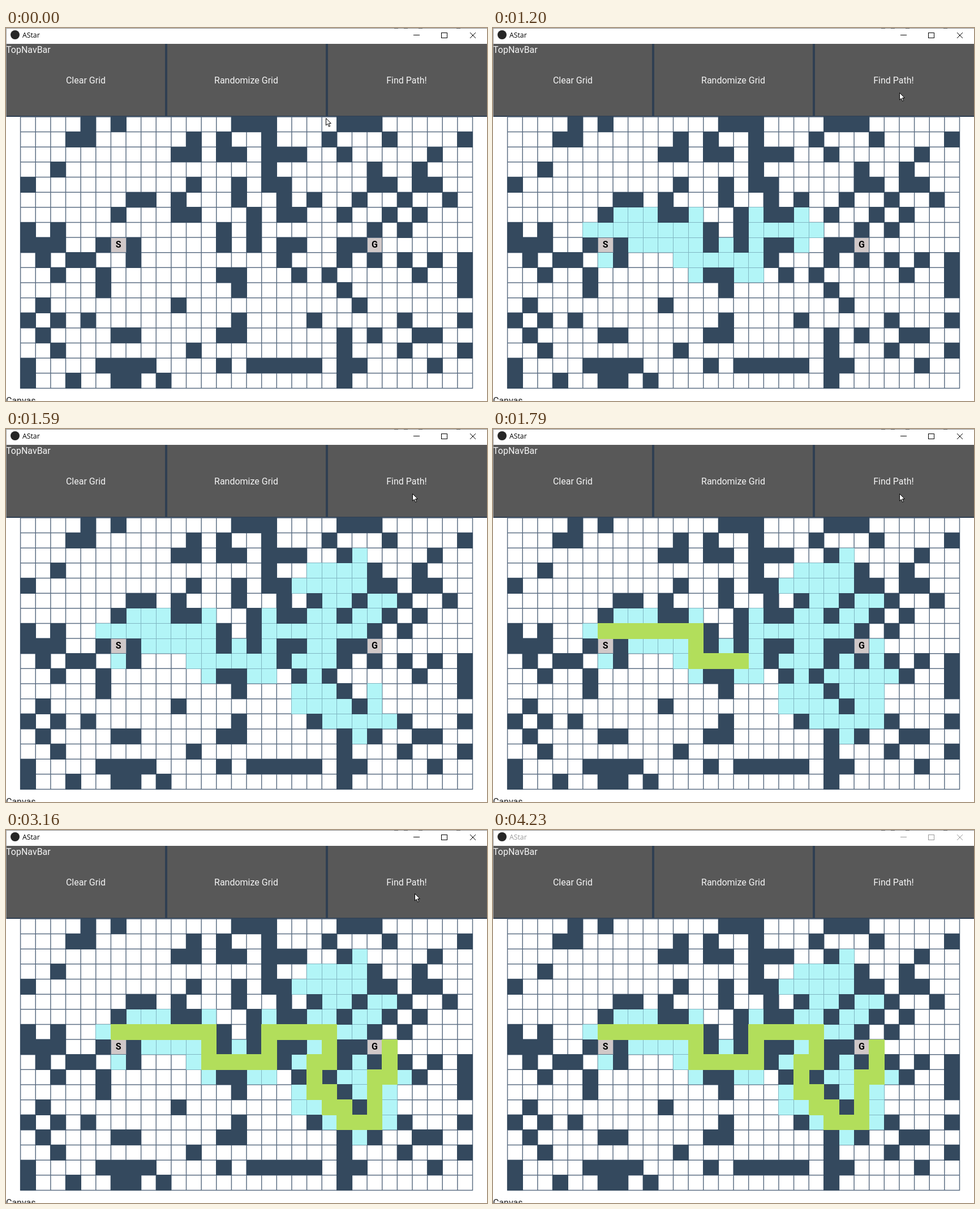
An HTML page with a canvas that plays this animation: 850 px wide and 659 px high, repeating every 4830 ms.

```html
<!DOCTYPE html>
<html lang="en">
<head>
<meta charset="utf-8">
<title>AStar</title>
<style>
  html, body { margin: 0; width: 100%; height: 100%; overflow: hidden; background: #fff; }
  canvas { display: block; }
</style>
</head>
<body>
<canvas id="stage" width="850" height="659"></canvas>
<script>
const ctx = document.getElementById('stage').getContext('2d');
const LOOP = 4830, COLS = 30, ROWS = 18;
const SLATE = '#34495e', LINE = '#5d6f84';
const START = [6, 8], GOAL = [23, 8];

const maze = [
  '....#.#.......###....###',
  '...##......#.#..#...#...#....#',
  '..........##.##.###..#.....#',
  '..#.............#......#..#',
  '#..........#..#.##.....##.##',
  '.......##.#...#..#.#..#..#..#',
  '......#...##...#.##..#..#.#',
  '#.#..........#.#.......#.#',
  '###..#.#.....#.#.##..##',
  '.#.##..#.........#...#.#.#.#.#',
  '..#..#.......##...#.#.....#..#',
  '.....#........#......#.......#',
  '.#........#...........#',
  '#.#.#.........#....#.....#...#',
  '.#....##.....##......#.#..##',
  '..#........#.........#...#...#',
  '#....####....#.#####.##....#',
  '#..#..##.#...........#'
];
const isWall = (x, y) => maze[y][x] === '#';
const gridX = c => 25.1 + 26.63 * c;
const gridY = r => 156.45 + 26.64 * r;
const colX = c => Math.round(gridX(c));
const rowY = r => Math.round(gridY(r));

// Best-first search with an octile distance; returns cells in order of discovery.
function search() {
  const dist = (x, y) => {
    const dx = Math.abs(x - GOAL[0]), dy = Math.abs(y - GOAL[1]);
    return Math.max(dx, dy) + (Math.SQRT2 - 1) * Math.min(dx, dy);
  };
  const node = (x, y, from) => ({ x, y, from, h: dist(x, y) });
  const seen = [], known = new Set([START + '']);
  const open = [node(...START, null)];
  let cur;
  while (open.length) {
    open.sort((a, b) => a.h - b.h || a.x - b.x || a.y - b.y);
    cur = open.shift();
    if (cur.h <= 1) break;
    for (const [dx, dy] of [[0, -1], [1, 0], [0, 1], [-1, 0]]) {
      const x = cur.x + dx, y = cur.y + dy, key = [x, y] + '';
      if (x < 0 || y < 0 || x >= COLS || y >= ROWS || isWall(x, y) || known.has(key)) continue;
      known.add(key);
      const next = node(x, y, cur);
      seen.push(next);
      open.push(next);
    }
  }
  const path = [];
  for (; cur.from; cur = cur.from) path.unshift(cur);
  return { seen, path };
}
const { seen, path } = search();

// Linear interpolation through [key, value...] points.
function through(points, k) {
  let i = 1;
  while (i < points.length - 1 && k > points[i][0]) i++;
  const a = points[i - 1], b = points[i];
  const f = Math.min(1, Math.max(0, (k - a[0]) / (b[0] - a[0])));
  return a.slice(1).map((v, j) => v + (b[j + 1] - v) * f);
}

// Cells painted so far, by screen refresh.
const progress = [[0, 3], [3, 11], [13, 37], [26, 76], [40, 123]];
function painted(t) {
  const tick = Math.floor((t - 811) / 29.6);
  return tick < 0 ? 0 : Math.floor(through(progress, tick)[0] + 0.01);
}

const leaving = [
  [0, 722, 112], [3, 741, 80], [5, 762, 56], [7, 783, 49], [9, 800, 76],
  [11, 804, 150], [13, 800, 250], [15, 791, 350], [18, 783, 425],
  [21, 794, 512], [24, 824, 602], [26, 843, 648], [27, 852, 670]
];
function pointer(t) {
  if (t < 140) return [565, 159];
  if (t < 820) {
    const k = Math.min(10, Math.floor((t - 140) / 31.1) + 1) / 10;
    const e = k * k * (3 - 2 * k);
    return [565 + 153 * e, 159 - 41 * e];
  }
  if (t < 3160) return [718, 114];
  const step = t < 3710 ? Math.min(15, Math.floor((t - 3160) / 34.6))
                        : 16 + Math.min(11, Math.floor((t - 3710) / 28.1));
  return through(leaving, step);
}

function box(color, x, y, w, h) {
  ctx.fillStyle = color;
  ctx.fillRect(x, y, w, h);
}

function cell(color, x, y, edge) {
  const l = colX(x), t = rowY(y), w = colX(x + 1) - l + 1, h = rowY(y + 1) - t + 1;
  box(edge || color, l, t, w, h);
  if (edge) box(color, l + 1, t + 1, w - 2, h - 2);
}

function text(str, x, y, color, font = '16px Roboto, sans-serif', align = 'left') {
  ctx.fillStyle = color;
  ctx.font = font;
  ctx.textAlign = align;
  ctx.fillText(str, x, y);
}

function titleBar(active) {
  box('#8c8c8c', 0, 0, 850, 1);
  for (const x of [686, 703, 729, 796]) box('#444', x, 0, 7, 1);
  ctx.fillStyle = '#262626';
  ctx.beginPath();
  ctx.arc(16, 12, 8, 0, 7);
  ctx.fill();
  const ink = active ? '#000' : '#999';
  text('AStar', 29, 17, ink, '12.3px "Open Sans", sans-serif');
  box(ink, 720, 12, 11, 1);
  ctx.strokeStyle = ink;
  ctx.lineWidth = 1;
  ctx.strokeRect(769.5, 8.5, 10, 9);
  ctx.beginPath();
  ctx.moveTo(820, 8);
  ctx.lineTo(830, 18);
  ctx.moveTo(830, 8);
  ctx.lineTo(820, 18);
  ctx.stroke();
}

function navBar() {
  box('#2f3f52', 1, 28, 849, 129);
  ['Clear Grid', 'Randomize Grid', 'Find Path!'].forEach((label, i) => {
    box('#585858', 1 + 284 * i, 28, i < 2 ? 280 : 281, 127);
    text(label, 141 + 283.5 * i, 98, '#f4f4f4', undefined, 'center');
  });
  text('TopNavBar', 0, 44, '#f4f4f4');
  box('#a0a0a0', 0, 0, 1, 157);
}

// Soft lines, a little wider than one pixel.
function gridLines() {
  ctx.strokeStyle = LINE;
  ctx.lineWidth = 1.5;
  ctx.beginPath();
  for (let c = 0; c <= COLS; c++) {
    ctx.moveTo(gridX(c) + 0.5, gridY(0));
    ctx.lineTo(gridX(c) + 0.5, gridY(ROWS) + 1);
  }
  for (let r = 0; r <= ROWS; r++) {
    ctx.moveTo(gridX(0), gridY(r) + 0.5);
    ctx.lineTo(gridX(COLS) + 1, gridY(r) + 0.5);
  }
  ctx.stroke();
}

function board(count) {
  gridLines();
  for (const n of seen.slice(0, count)) cell('#b2f5f7', n.x, n.y, '#80b7c3');
  maze.forEach((row, y) => {
    for (let x = 0; x < row.length; x++) if (isWall(x, y)) cell(SLATE, x, y);
  });
  for (const [label, [x, y]] of [['S', START], ['G', GOAL]]) {
    cell('#d0c8c8', x, y, LINE);
    text(label, gridX(x) + 13.8, rowY(y) + 18, '#000', 'bold 16px Roboto, sans-serif', 'center');
  }
  for (const n of path.slice(0, Math.max(0, count - seen.length))) cell('#b2de5b', n.x, n.y);
}

const arrow = new Path2D('M.5 .5V13L3.4 10.3L5.6 15.3L7.6 14.4L5.4 9.6H9.4Z');
function drawPointer(x, y) {
  ctx.save();
  ctx.translate(Math.round(x), Math.round(y));
  ctx.fillStyle = '#fff';
  ctx.strokeStyle = '#000';
  ctx.lineWidth = 1;
  ctx.fill(arrow);
  ctx.stroke(arrow);
  ctx.restore();
}

function draw() {
  const t = performance.now() % LOOP;
  box('#fff', 0, 0, 850, 659);
  titleBar(t < 4230);
  navBar();
  board(painted(t));
  text('Canvas', 0, 664, '#222');
  drawPointer(...pointer(t));
  requestAnimationFrame(draw);
}
draw();
</script>
</body>
</html>
```
